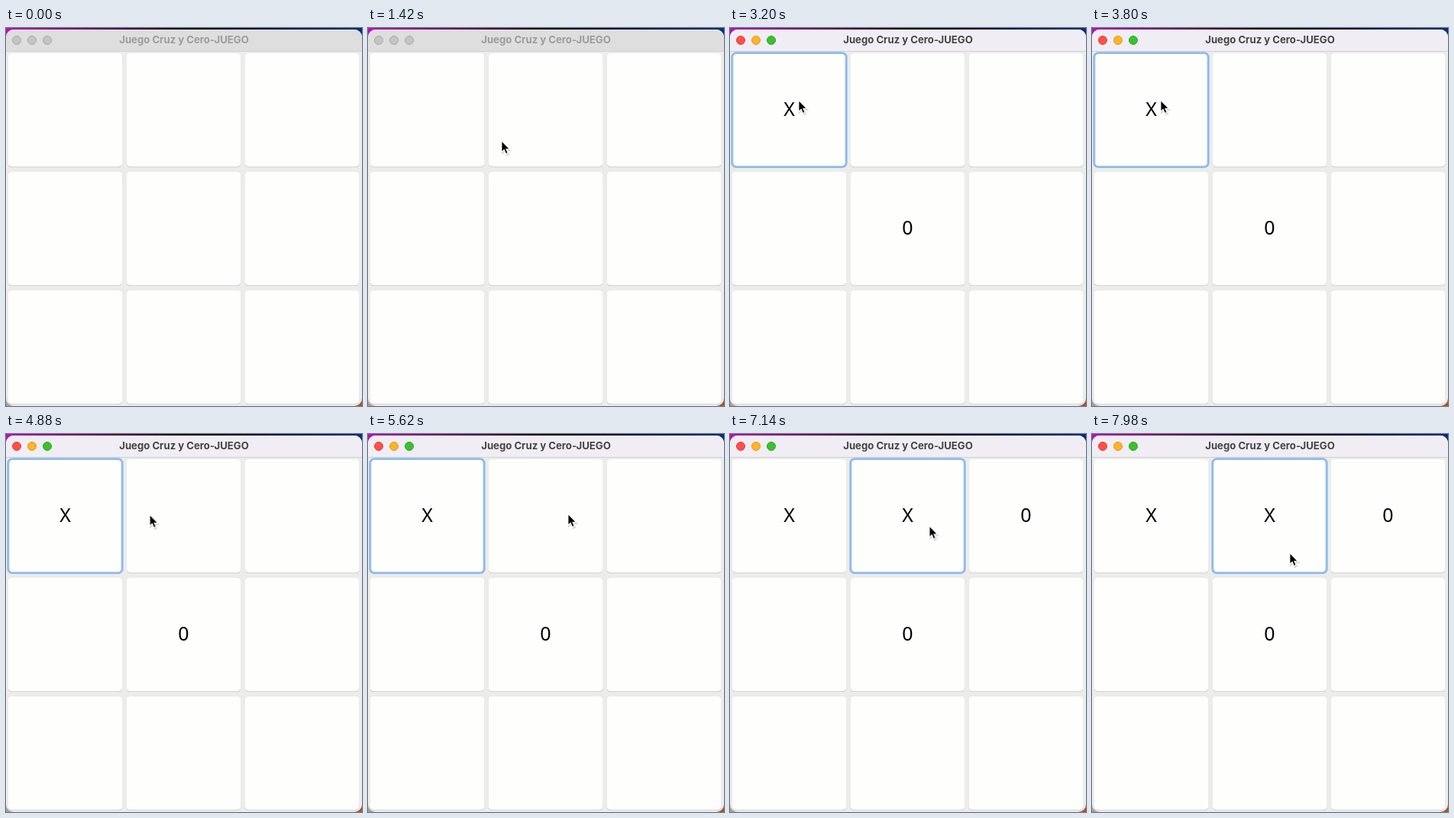
Recreate the animation shown at these times as an HTML page. Size 466 by 494 pixels, loop 8000 ms.

```html
<!DOCTYPE html>
<html lang="es">
<head>
<meta charset="utf-8">
<title>Juego</title>
<style>
  html, body { margin: 0; width: 100%; height: 100%; overflow: hidden; background: #ececea; }
  svg { display: block; width: 466px; height: 494px; }
  .title { font: 700 13.15px Inter, sans-serif; text-anchor: middle; }
  .mark { font: 500 25px "Noto Sans", sans-serif; text-anchor: middle; }
  .cell { fill: #fefefd; }
  .edge { fill: #c6c6c8; }
  .pressed { fill: #e6e6e6; }
  .ring { fill: none; stroke: #82b4ec; stroke-width: 2.6; }

  .timed { animation: 8s step-end infinite; }
  .active { animation-name: active; }
  .press1 { animation-name: press1; }
  .move1 { animation-name: move1; }
  .focus1 { animation-name: focus1; }
  .press2 { animation-name: press2; }
  .focus2 { animation-name: focus2; }
  .move2 { animation-name: move2; }
  .pointer { animation: travel 8s ease-in-out infinite; }

  @keyframes active { 0% { opacity: 0 } 35% { opacity: 1 } }
  @keyframes press1 { 0% { opacity: 0 } 35% { opacity: 1 } 37% { opacity: 0 } }
  @keyframes move1 { 0% { opacity: 0 } 37% { opacity: 1 } }
  @keyframes focus1 { 0% { opacity: 0 } 35% { opacity: 1 } 78% { opacity: 0 } }
  @keyframes press2 { 0% { opacity: 0 } 78% { opacity: 1 } 80.25% { opacity: 0 } }
  @keyframes focus2 { 0% { opacity: 0 } 78% { opacity: 1 } }
  @keyframes move2 { 0% { opacity: 0 } 80.25% { opacity: 1 } }
  @keyframes travel {
    0%, 10% { transform: translate(225px, 500px) }
    17.25%, 19% { transform: translate(175px, 148px) }
    24.75%, 54.5% { transform: translate(90px, 95px); animation-timing-function: ease-in }
    61% { transform: translate(188px, 106px); animation-timing-function: ease-out }
    67%, 86% { transform: translate(262px, 105px) }
    94.5%, 100% { transform: translate(259px, 156px) }
  }
</style>
</head>
<body>
<svg viewBox="0 0 466 494">
  <defs>
    <linearGradient id="desk">
      <stop offset="0" stop-color="#b414b4"/>
      <stop offset=".25" stop-color="#64105c"/>
      <stop offset=".5" stop-color="#120812"/>
      <stop offset=".75" stop-color="#041a40"/>
      <stop offset="1" stop-color="#083078"/>
    </linearGradient>
    <clipPath id="frame"><rect y="2" width="466" height="492" rx="10"/></clipPath>
    <rect id="slot" width="150" height="148.5" rx="5"/>
    <g id="tile">
      <use href="#slot" class="edge" y=".8"/>
      <use href="#slot" class="edge" opacity=".3" y="-.5"/>
      <use href="#slot" class="cell"/>
    </g>
    <g id="row">
      <use href="#tile"/><use href="#tile" x="155"/><use href="#tile" x="310"/>
    </g>
    <rect id="halo" x=".3" y="-.2" width="149.4" height="149" rx="5.5"/>
  </defs>

  <rect width="466" height="250" fill="url(#desk)"/>
  <rect y="250" width="233" height="244" fill="#a8a098"/>
  <rect x="233" y="250" width="233" height="244" fill="#a85428"/>

  <g clip-path="url(#frame)">
    <rect width="466" height="494" fill="#ececea"/>
    <rect width="466" height="30" fill="#dededf"/>
    <g fill="#c4c4c4" stroke="#a8a8a8">
      <circle cx="14" cy="16" r="5.5"/><circle cx="34" cy="16" r="5.5"/><circle cx="54" cy="16" r="5.5"/>
    </g>
    <text class="title" x="233" y="20" fill="#9c9c9c">Juego Cruz y Cero-JUEGO</text>

    <g class="timed active">
      <rect width="466" height="30" fill="#f0eef4"/>
      <circle cx="14" cy="16" r="5.5" fill="#ff5048" stroke="#e0403c"/>
      <circle cx="34" cy="16" r="5.5" fill="#ffb326" stroke="#de9a20"/>
      <circle cx="54" cy="16" r="5.5" fill="#3cc030" stroke="#30a428"/>
      <text class="title" x="233" y="20" fill="#444444">Juego Cruz y Cero-JUEGO</text>
    </g>
    <rect y="30" width="466" height="1" fill="#d2d2d2"/>

    <use href="#row" x="2.5" y="32.8"/>
    <use href="#row" x="2.5" y="187.8"/>
    <use href="#row" x="2.5" y="342.8"/>

    <use href="#slot" x="2.5" y="32.8" class="pressed timed press1"/>
    <use href="#slot" x="157.5" y="32.8" class="pressed timed press2"/>
    <use href="#halo" x="2.5" y="32.8" class="ring timed focus1"/>
    <use href="#halo" x="157.5" y="32.8" class="ring timed focus2"/>

    <g class="mark timed move1">
      <text x="77.5" y="115">X</text><text x="232.5" y="270">0</text>
    </g>
    <g class="mark timed move2">
      <text x="232.5" y="115">X</text><text x="387.5" y="115">0</text>
    </g>
  </g>

  <g class="pointer">
    <path d="M0 0V14L3.2 11L5.6 16.4L8 15.4L5.7 10.2H10Z" transform="translate(1 1.5)"
      fill="none" stroke="#808080" stroke-opacity=".3" stroke-width="2"/>
    <path d="M.4 .8V13L3.3 10.3L5.7 15.8L7.4 15L5.1 9.7H9.2Z" stroke="#fff" stroke-width="2" paint-order="stroke"/>
  </g>
</svg>
</body>
</html>
```
